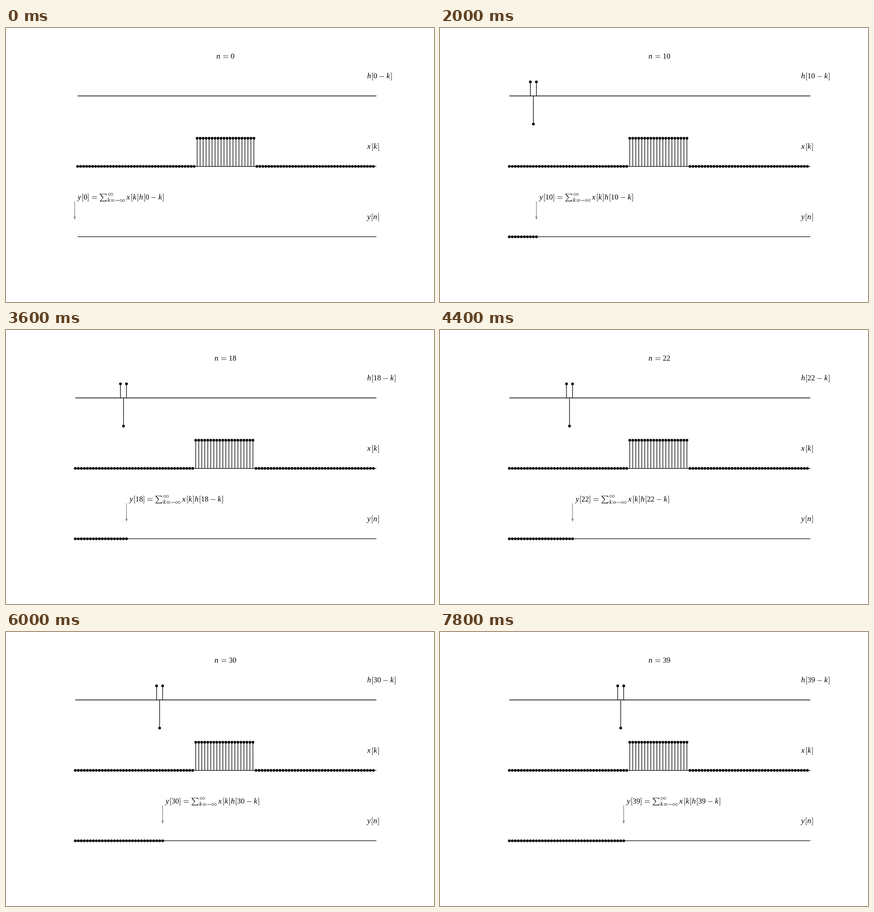
Write an HTML page that moves like this. It is 935 px wide and 599 px high and loops after 8 s.

```html
<!DOCTYPE html>
<html lang="en">
<head>
<meta charset="utf-8">
<title>Discrete convolution</title>
<style>
  html, body { margin: 0; width: 100%; height: 100%; overflow: hidden; background: #fff; }
  svg { display: block; width: 100%; height: 100%; }
  text { font-family: "Liberation Serif", "Times New Roman", serif; fill: #000; }
  .var { font-style: italic; }
  .rule { fill: none; stroke: #000; stroke-width: .8; }
  .plot { fill: none; stroke: #000; stroke-width: 1.3; }
</style>
</head>
<body>
<svg id="stage" viewBox="0 0 935 599"></svg>
<script>
const STEP = 200, STEPS = 40;
const EM = 16.35;
const UNIT = 61.6, RADIUS = 3;
const COUNT = 100, RIGHT = 809.1;
const AXIS = { h: 148.5, x: 302.6, y: 456.4 };
const H = [0.5, -1, 0.5];

const stage = document.getElementById('stage');

// Advance widths in em
const WIDTH = { n: .6, h: .576, k: .553, x: .572, y: .526, '[': .278, ']': .278, '=': 1.334, '-': 1.222 };
const widthOf = c => WIDTH[c] || .5;
const measure = s => [...s].reduce((sum, c) => sum + widthOf(c), 0) * EM;

const rule = d => `<path class="rule" d="${d}"/>`;
const glyph = (c, x, y, size, cls = '') =>
  `<text class="${cls}" x="${x.toFixed(2)}" y="${y}" font-size="${size}">${c}</text>`;
const bar = (x, y, w) => `M${x} ${y}h${w}`;

function drawChar(c, x, y) {
  const mid = y - .25 * EM;
  if (c === '[') return rule(`M${x + .255 * EM} ${y - .73 * EM}h${-.115 * EM}v${.96 * EM}h${.115 * EM}`);
  if (c === ']') return rule(`M${x + .023 * EM} ${y - .73 * EM}h${.115 * EM}v${.96 * EM}h${-.115 * EM}`);
  if (c === '=') {
    const left = x + .334 * EM, w = .666 * EM, gap = .117 * EM;
    return rule(bar(left, mid - gap, w) + bar(left, mid + gap, w));
  }
  if (c === '-') return rule(bar(x + .305 * EM, mid, .612 * EM));
  return /[a-z]/.test(c) ? glyph(c, x + .3, y, 17, 'var') : glyph(c, x, y, EM);
}

function formula(s, x, y) {
  let out = '';
  for (const c of s) {
    out += drawChar(c, x, y);
    x += widthOf(c) * EM;
  }
  return out;
}

const infinity = (x, y) =>
  `<path class="rule" transform="translate(${x} ${y})" d="M0 0C1.2-1.7 2.2-2.4 3.1-2.4C5.9-2.4 5.9 2.4 3.1 2.4` +
  'C2.2 2.4 1.2 1.7 0 0C-1.2-1.7-2.2-2.4-3.1-2.4C-5.9-2.4-5.9 2.4-3.1 2.4C-2.2 2.4-1.2 1.7 0 0"/>';

const SIGMA = 'M.056-.75H.93L1-.53H.97C.93-.66.84-.705.62-.705H.19L.54-.27L.16.185H.62' +
  'C.84.185.93.14.97.01H1L.93.25H.056V.22L.45-.235L.056-.72Z';

// Sum over k from -infinity to infinity; x is the left edge of the sign
function sumSign(x, y) {
  const end = x + 1.056 * EM, low = y + 2.2;
  return `<path transform="translate(${x} ${y}) scale(${EM})" d="${SIGMA}"/>` +
    infinity(end + 7.2, y - 11.2) +
    glyph('k', end + .7, y + 5.3, 12.3, 'var') +
    rule(bar(end + 8, low - 1.4, 8.2) + bar(end + 8, low + 1.4, 8.2) + bar(end + 18.3, low, 7.8)) +
    infinity(end + 32.8, low);
}

function equation(n, x, y) {
  const head = `y[${n}]=`;
  const sumX = x + measure(head);
  return formula(head, x, y) + sumSign(sumX, y) + formula(`x[k]h[${n}-k]`, sumX + 59, y);
}

function stem(x, axis, value) {
  const y = axis - value * UNIT;
  return (value ? `<path class="plot" d="M${x} ${axis}V${y}"/>` : '') +
    `<circle cx="${x}" cy="${y}" r="${RADIUS}"/>`;
}

const arrow = x =>
  `<path d="M${x} 379V414" stroke="#808080" stroke-width="1.3"/>` +
  `<path d="M${x} 419.6l-2.5-7.6q2.5 1.2 5 0z" fill="#808080"/>`;

function render(n) {
  // The horizontal range starts at 0 for n = 0 and at 1 afterwards
  const dx = n ? 6.577 : 6.526;
  const px = k => RIGHT - dx * (COUNT + 1 - k);
  let out = '';

  for (const y of Object.values(AXIS)) out += `<path class="plot" d="M${px(1)} ${y}H${RIGHT}"/>`;
  for (let k = 1; k <= COUNT; k++) {
    out += stem(px(k), AXIS.x, k > 40 && k <= 60 ? 1 : 0);
    if (k <= n) out += stem(px(k), AXIS.y, 0);
  }
  H.forEach((v, i) => {
    if (n - i >= 1) out += stem(px(n - i), AXIS.h, v);
  });

  const title = `n=${n}`;
  out += formula(title, 479.2 - measure(title) / 2, 66.8);
  out += formula(`h[${n}-k]`, 788.8, 110.2);
  out += formula('x[k]', 788.8, 264.3);
  out += formula('y[n]', 788.8, 418);
  out += arrow(px(n)) + equation(n, px(n + 1) - .2, 374.8);
  stage.innerHTML = out;
}

let shown = -1;
const start = performance.now();
function tick() {
  const n = Math.floor((performance.now() - start) / STEP) % STEPS;
  if (n !== shown) render(shown = n);
  requestAnimationFrame(tick);
}
tick();
</script>
</body>
</html>
```
